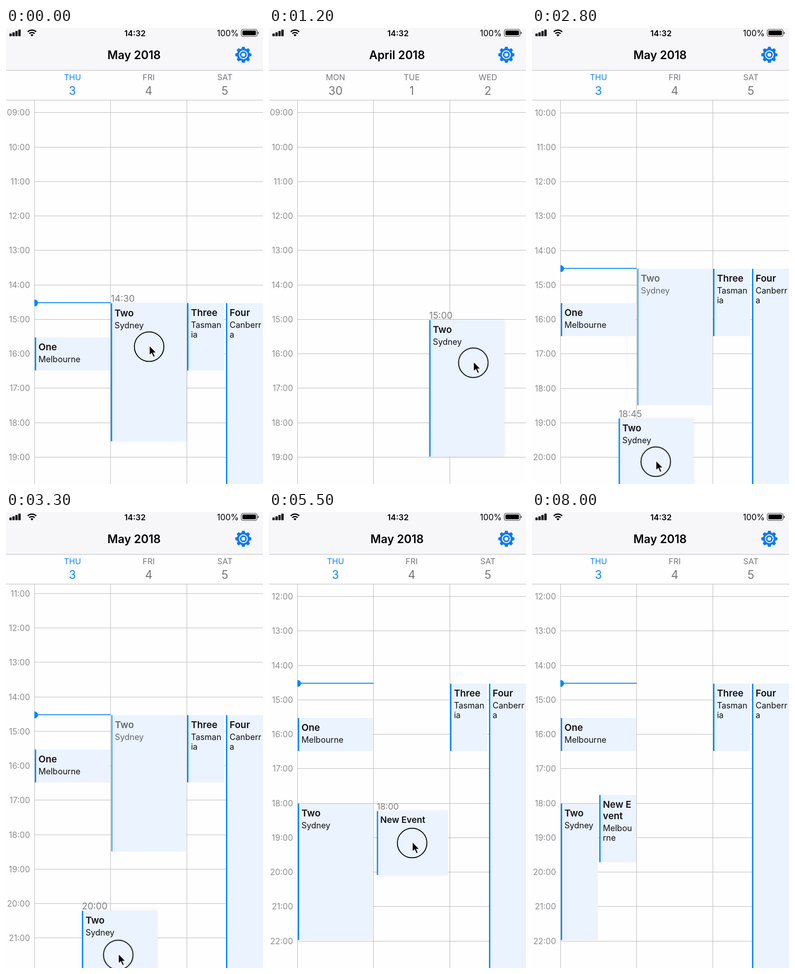
These frames come from a looping animation (562x996 px, 8.1 s). An HTML page:

```html
<!DOCTYPE html>
<html lang="en">
<head>
<meta charset="utf-8">
<title>Calendar drag and drop</title>
<style>
  :root { --blue: #0a84ff; --line: #b7b7bc; --loop: 8.1s; }
  html, body { margin: 0; width: 100%; height: 100%; overflow: hidden; background: #fff; }
  body, #stage { font-family: Inter, Roboto, sans-serif; }
  #stage { position: relative; width: 562px; height: 996px; overflow: hidden; background: #fefefe; }
  #stage div, #stage svg, #stage time { position: absolute; white-space: nowrap; }

  /* top bars */
  #bar { left: 0; top: 0; width: 562px; height: 92px; background: #f7f6f8; border-bottom: 1px solid var(--line); }
  #rule { left: 0; top: 157px; width: 562px; height: 1px; background: var(--line); }
  .clock { left: 0; width: 564px; top: 0; text-align: center; font: 600 17.5px/23px Inter, sans-serif; }
  .charge { right: 53px; top: 0; font-size: 18px; line-height: 23px; }
  .title { left: 0; width: 560px; top: 43px; text-align: center; font: 600 25px/32px Inter, sans-serif; }

  /* calendar */
  #hours { left: 0; top: 158px; width: 62px; height: 838px; overflow: hidden; }
  #hours time { right: 9.5px; margin-top: -11px; font-size: 18px; line-height: 23px; color: #8e8e93; }
  #view { left: 62px; top: 93px; width: 500px; height: 903px; overflow: hidden; }
  #strip { left: 0; top: 0; width: 1000px; height: 903px; }
  #body { left: 0; top: 65px; width: 1000px; height: 838px; overflow: hidden; }
  .scroll { left: 0; top: 26.3px; width: 100%; height: 0; }
  .row { left: 0; width: 1000px; height: 1px; background: var(--line); }
  .edge { top: 65px; width: 1px; height: 838px; margin-left: -.5px; background: var(--line); }
  .day { top: 3px; width: 166.67px; text-align: center; color: #77777b; font-size: 17.5px; line-height: 24px; }
  .day span { display: block; font-size: 25px; line-height: 34px; }
  .today { color: var(--blue); }
  .now { left: 500px; top: 415px; width: 167px; height: 2px; background: #1388ec; }
  .dot { left: 500px; top: 408.5px; width: 7.5px; height: 15px; border-radius: 0 8px 8px 0; background: var(--blue); }

  .event { box-sizing: border-box; width: 164px; border-left: 3px solid #0a8cfa; background: #eaf3fe;
           color: #111; font-size: 18px; line-height: 21px; padding: 8px 0 0 5px; }
  .event strong { display: block; font-weight: 600; font-size: 20.5px; line-height: 25px; margin-bottom: 4px; }
  .slim { width: 81px; }
  .dim { color: #66696d; border-color: #58abf0; }
  .drag { box-shadow: 0 0 8px rgba(0, 0, 0, .08); }
  .drag time { left: -3px; top: -22px; font-size: 20px; line-height: 24px; color: #7e7e82; }
  .hand { left: 0; top: 0; }

  /* motion */
  .hand, .scroll, #strip, .show, .drag, #two { animation: var(--loop) linear infinite both; }
  .show, #two { animation-timing-function: step-end; }
  .scroll { animation-name: scroll; animation-timing-function: ease-in-out; }
  #strip { animation-name: page; animation-timing-function: ease-in-out; }
  .hand { animation-name: hand; }
  .lag { animation-delay: .04s; }
  .may { animation-name: may; }
  .april { animation-name: april; }
  .first { animation-name: first; }
  #two { animation-name: two; }
  .second { animation-name: second; }
  .placed { animation-name: placed; }
  .press { animation-name: press; }
  .pointer { animation-name: pointer; }
  .lift { animation-name: lift; }
  .pop { animation-name: pop; }

  @keyframes page {
    0%, 6.79% { transform: translateX(-500px); }
    10.49%, 20.37% { transform: none; }
    24.07%, 100% { transform: translateX(-500px); }
  }
  @keyframes scroll {
    0%, 30.12% { transform: translateY(0); }
    33.83%, 35.06% { transform: translateY(-75px); }
    38.77%, 40% { transform: translateY(-151px); }
    43.7%, 100% { transform: translateY(-226px); }
  }
  @keyframes hand {
    0% { transform: translate(313px, 696px); }
    1.23% { transform: translate(308px, 696px); }
    6.17% { transform: translate(105px, 705px); }
    7.41% { transform: translate(75px, 708px); }
    9.26% { transform: translate(80px, 710px); }
    11.11% { transform: translate(160px, 716px); }
    14.32% { transform: translate(433px, 731px); }
    14.81% { transform: translate(446.5px, 731px); }
    18.52% { transform: translate(505px, 760px); }
    20.99% { transform: translate(515px, 780px); }
    22.84% { transform: translate(500px, 800px); }
    27.16%, 28.4% { transform: translate(286px, 937.5px); }
    32.1% { transform: translate(280px, 940px); }
    40.25% { transform: translate(249px, 964px); }
    40.74% { transform: translate(245.5px, 967.5px); }
    44.44% { transform: translate(235px, 960px); }
    45.68% { transform: translate(225px, 950px); }
    49.38% { transform: translate(155px, 745px); }
    50.62%, 53.7% { transform: translate(148px, 733px); }
    59.88%, 68.15% { transform: translate(313px, 723px); }
    70.37% { transform: translate(352px, 680px); }
    72.84% { transform: translate(310px, 590px); }
    74.07% { transform: translate(270px, 573px); }
    76.54% { transform: translate(230px, 600px); }
    79.01% { transform: translate(265px, 640px); }
    80.86% { transform: translate(312px, 625px); }
    82.72% { transform: translate(280px, 615px); }
    85.43%, 89.51% { transform: translate(227px, 693.5px); }
    91.36% { transform: translate(200px, 637px); }
    95.06% { transform: translate(290px, 945px); }
    96%, 100% { transform: translate(313px, 696px); }
  }
  @keyframes april { 0%, 24.07%, 100% { opacity: 0; } 10.49% { opacity: 1; } }
  @keyframes may { 0%, 24.07%, 100% { opacity: 1; } 10.49% { opacity: 0; } }
  @keyframes first { 0% { opacity: 1; } 52.47%, 100% { opacity: 0; } }
  @keyframes two {
    0% { opacity: 0; width: 164px; }
    52.47% { opacity: 1; width: 164px; }
    87.04%, 100% { opacity: 1; width: 81px; }
  }
  @keyframes second { 0%, 87.04%, 100% { opacity: 0; } 66.91% { opacity: 1; } }
  @keyframes placed { 0% { opacity: 0; } 87.04%, 100% { opacity: 1; } }
  @keyframes press { 0%, 60.49% { opacity: 1; } 52.47%, 86.17%, 100% { opacity: 0; } }
  @keyframes pointer { 0% { opacity: 1; } 95.68%, 100% { opacity: 0; } }
  @keyframes lift { 0% { transform: scale(1.01); } 1.23%, 100% { transform: none; } }
  @keyframes pop {
    0%, 66.91% { transform: scale(.6); }
    67.9% { transform: scale(.93); }
    69.14%, 100% { transform: none; }
  }
</style>
</head>
<body>
<div id="stage">
  <div id="hours"><div class="scroll"></div></div>

  <div id="view">
    <div id="strip">
      <div id="body">
        <div class="scroll" id="grid">
          <div class="now"></div><div class="dot"></div>
          <div class="event" style="left:501px;top:492px;height:72px"><strong>One</strong>Melbourne</div>
          <div class="event" id="two" style="left:501px;top:679px;height:298px"><strong>Two</strong>Sydney</div>
          <div class="event slim show placed" style="left:585px;top:659.5px;height:147px"><strong>New E<br>vent</strong>Melbou<br>rne</div>
          <div class="event dim show first" style="left:668px;top:416.5px;height:298px"><strong>Two</strong>Sydney</div>
          <div class="event slim" style="left:834.4px;top:416.5px;height:147px"><strong>Three</strong>Tasman<br>ia</div>
          <div class="event slim" style="left:919px;top:416.5px;height:720px"><strong>Four</strong>Canberr<br>a</div>
        </div>
      </div>
    </div>
  </div>

  <div id="bar"></div>
  <div id="rule"></div>
  <div class="clock">14:32</div>
  <div class="charge">100%</div>
  <div class="title show may">May 2018</div>
  <div class="title show april">April 2018</div>
  <svg width="562" height="92" style="left:0;top:0">
    <g>
      <rect x="7.5" y="12" width="5" height="6" rx="1"/>
      <rect x="14" y="9.5" width="5" height="8.5" rx="1"/>
      <rect x="20.5" y="6.5" width="5" height="11.5" rx="1"/>
      <rect x="27" y="3.5" width="5" height="14.5" rx="1"/>
    </g>
    <g fill="none" stroke="#000" stroke-width="2.8">
      <path d="M47.5 8.5a13 13 0 0 1 18.5 0M51 12.3a8.2 8.2 0 0 1 11.5 0"/>
      <path d="M56.75 18.5l-3.2-3.5a4.6 4.6 0 0 1 6.4 0z" fill="#000" stroke="none"/>
    </g>
    <rect x="514.5" y="3" width="34.5" height="15.5" rx="4" fill="none" stroke="#333" stroke-width="1.2"/>
    <rect x="517" y="5.5" width="29.5" height="10.5" rx="2"/>
    <path d="M550.5 8q2.5 1 2.5 2.800t-2.5 2.800z" fill="#444"/>
    <g id="gear" transform="translate(519 58.5)" fill="none" stroke="#0878f7">
      <circle r="11.8" stroke-width="4.2"/>
      <circle r="5.8" stroke-width="3.4"/>
    </g>
  </svg>

  <div class="hand lag"><div class="show first">
    <div class="event drag lift" style="left:-83px;top:-93.5px;height:298px"><time></time><strong>Two</strong>Sydney</div>
  </div></div>
  <div class="hand lag"><div class="show second">
    <div class="event drag pop" style="left:-83px;top:-75.5px;width:167px;height:150px"><time></time><strong>New Event</strong></div>
  </div></div>
  <div class="hand">
    <svg class="show pointer" width="80" height="80" style="left:-40px;top:-40px" viewBox="-40 -40 80 80">
      <circle class="show press" r="32.3" fill="none" stroke="#000" stroke-width="2"/>
      <path d="M.5-2.5v21.5l5-4.5 3.8 8.5 3.7-1.6-3.7-8h6.7z" stroke="#fff" stroke-width="1.4"/>
    </svg>
  </div>
</div>

<script>
  const HOUR = 75.25, FIRST = 9;
  const $ = s => document.querySelector(s);
  const pad = n => String(n).padStart(2, '0');

  function add(parent, tag, cls, style, html = '') {
    const el = document.createElement(tag);
    el.className = cls;
    Object.assign(el.style, style);
    el.innerHTML = html;
    parent.prepend(el);
  }

  const grid = $('#grid');
  for (let i = 0; i < 16; i++) {
    const top = i * HOUR + 'px';
    add(grid, 'div', 'row', { top });
    add($('#hours .scroll'), 'time', '', { top }, pad(FIRST + i) + ':00');
  }

  'MON 30,TUE 1,WED 2,THU 3,FRI 4,SAT 5'.split(',').forEach((day, i) => {
    const [name, date] = day.split(' '), left = i * 500 / 3 + 'px';
    add($('#strip'), 'div', 'edge', { left });
    add($('#strip'), 'div', name === 'THU' ? 'day today' : 'day', { left }, `${name}<span>${date}</span>`);
  });

  for (let a = 0; a < 360; a += 45) {
    $('#gear').insertAdjacentHTML('beforeend',
      `<path d="M-4-13l1.200-4.600h5.600l1.200 4.600z" fill="#0878f7" stroke="none" transform="rotate(${a})"/>`);
  }

  // Dragged events show their start time in quarter hours, whatever their scale.
  const drags = [...document.querySelectorAll('.drag')];
  function frame() {
    const origin = grid.getBoundingClientRect().top;
    for (const box of drags) {
      const top = box.parentNode.getBoundingClientRect().top + parseFloat(box.style.top);
      const quarters = Math.floor((top - origin) / HOUR * 4) + FIRST * 4;
      const text = pad(Math.floor(quarters / 4)) + ':' + pad(quarters % 4 * 15);
      const label = box.firstElementChild;
      if (label.textContent !== text) label.textContent = text;
    }
    requestAnimationFrame(frame);
  }
  frame();
</script>
</body>
</html>
```
